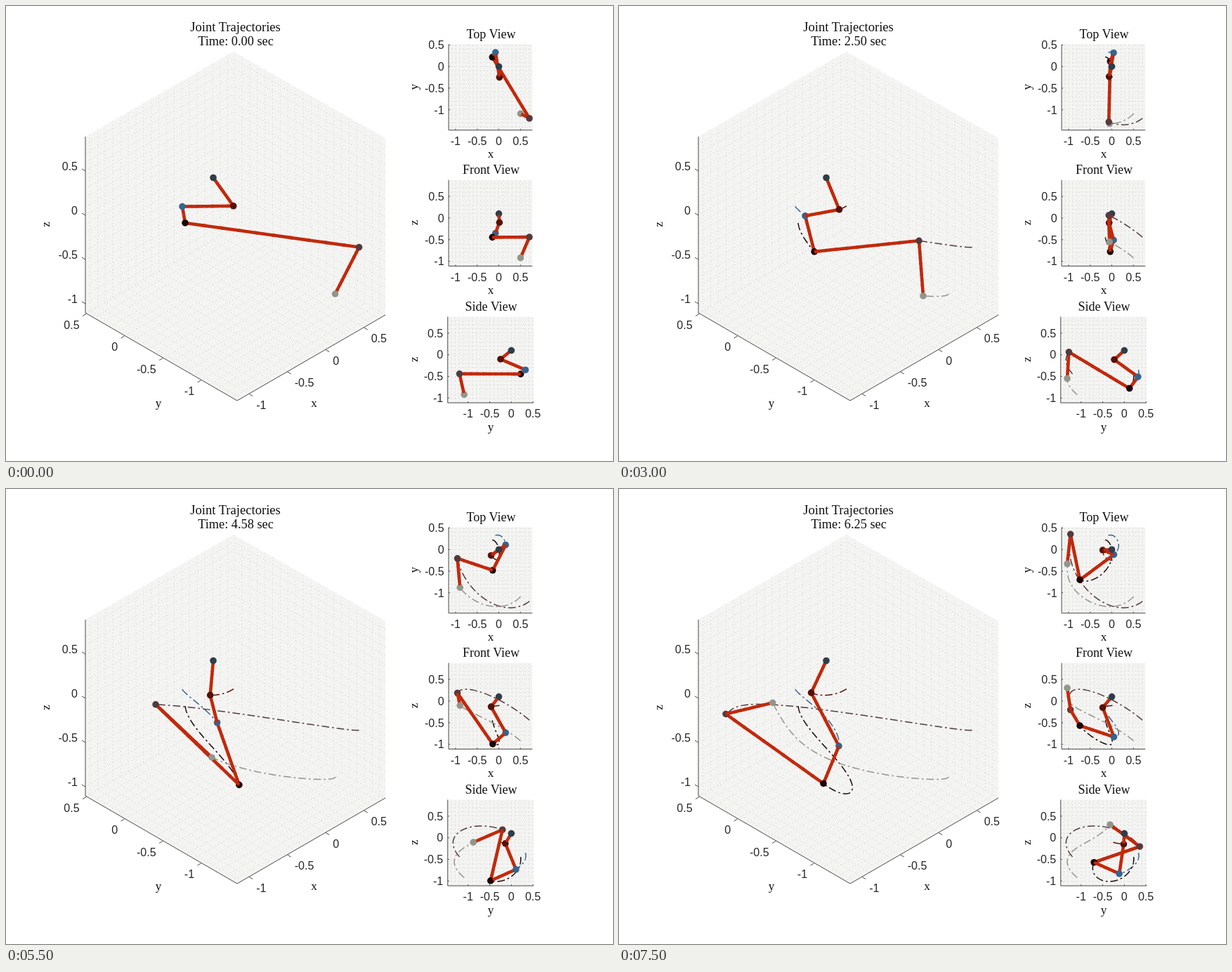
These frames come from a looping animation (864x648 px, 8 s). An HTML page:

```html
<!DOCTYPE html>
<html lang="en">
<head>
<meta charset="utf-8">
<title>Joint Trajectories</title>
<style>
  html, body { margin: 0; width: 100%; height: 100%; overflow: hidden; background: #fff; }
  svg { display: block; width: 864px; height: 648px; }
  .serif { font-family: "Liberation Serif", "Noto Serif", serif; fill: #111; }
  .tick { font: 16px "Liberation Sans", Inter, sans-serif; fill: #262626; }
  .face { fill: #f4f4f3; }
  .grid { stroke: #cfcfcc; stroke-width: 1; stroke-dasharray: 1 4; fill: none; }
  .axis { stroke: #4a4a4a; stroke-width: 1; fill: none; }
  .link { stroke: #c02a0c; stroke-width: 4.6; }
  .trail { fill: none; stroke-width: 1.5; stroke-dasharray: 10.7 4 2.7 4; }
</style>
</head>
<body>
<svg viewBox="0 0 864 648">
  <g id="back"></g>
  <g id="moving"></g>
</svg>
<script>
const LOOP = 8000, STEP = 500;
const COLORS = ['#2d3e49', '#561108', '#34658f', '#1c0604', '#543a3d', '#94958a'];

// All joints share one swing that starts at rest
const swing = t => 1 - Math.cos(t / 4);
const KEYS = [0, 3, 5, 6, 7.5].map(swing);

// Smooth curve through one [x, y, z] point per key
const through = (...points) => t => {
  const w = swing(t);
  const weights = KEYS.map(k => KEYS.reduce((p, m) => m === k ? p : p * (w - m) / (k - m), 1));
  return [0, 1, 2].map(axis => points.reduce((sum, p, i) => sum + p[axis] * weights[i], 0));
};

function shoulder(t) {
  const w = swing(t), r = .25 - .03 * w, a = -1.515 - 1.2 * w;
  return [r * Math.cos(a), r * Math.sin(a), -.102 - .037 * w];
}

const paths = [
  () => [0, 0, .1],
  shoulder,
  through([-.078, .326, -.35], [.041, .316, -.51], [.149, .163, -.69], [.153, .047, -.77], [.048, -.117, -.83]),
  through([-.15, .217, -.445], [-.037, .119, -.777], [-.049, -.338, -1.01], [-.274, -.604, -.936], [-.738, -.701, -.569]),
  through([.706, -1.198, -.44], [-.07, -1.281, .063], [-.877, -.464, .253], [-.978, .022, .082], [-.956, .356, -.203]),
  through([.502, -1.09, -.92], [-.054, -1.32, -.55], [-.775, -1.018, -.184], [-.977, -.734, -.025], [-1.03, -.33, .304])
];

const U = 61.6;
const VIEWS = [
  { at: ([x, y, z]) => [295 + 109 * (x - y), 257.1 - 63 * (x + y) - 126 * z],
    depth: ([x, y, z]) => (z - x - y) / 1.73 },
  { at: ([x, y]) => [701.5 + U * x, 86.2 - U * y], depth: p => p[2] },
  { at: ([x, , z]) => [701.5 + U * x, 302 - U * z], depth: p => -p[1] },
  { at: ([, y, z]) => [719.3 + U * y, 496.7 - U * z], depth: p => p[0] }
];

const fix = v => +v.toFixed(2);
const poly = pts => 'M' + pts.map(p => p.map(fix).join(' ')).join('L');
const path = (cls, pts, more = '') => `<path class="${cls}" d="${poly(pts)}" ${more}/>`;
const text = (cls, x, y, s, anchor = 'middle', more = '') =>
  `<text class="${cls}" x="${fix(x)}" y="${fix(y)}" text-anchor="${anchor}" ${more}>${s}</text>`;
const title = (x, y, s, size = 18) => text('serif', x, y, s, 'middle', `font-size="${size}"`);
const upright = (x, y, s) => text('serif', x, y, s, 'middle', `font-size="17" transform="rotate(-90 ${x} ${y})"`);
const tick = (x, y, v, anchor) => text('tick', x, y + 5.7, v, anchor);
const mix = (a, b, k) => a.map((v, i) => v + (b[i] - v) * k);

const MIN = [-1.16, -1.47, -1.11], MAX = [.775, .51, .88];
const MARKS = [-1, -.5, 0, .5];
const tenths = k => {
  const out = [];
  for (let i = Math.ceil(MIN[k] * 10); i <= MAX[k] * 10; i++) out.push(i / 10);
  return out;
};

// Grid lines of the plane spanned by axes a and b, the third held at `rest`
function grid(at, a, b, rest) {
  const line = (fixed, run) => tenths(fixed).map(v => {
    const p = [...rest], q = [...rest];
    p[fixed] = q[fixed] = v;
    p[run] = MIN[run];
    q[run] = MAX[run];
    return poly([at(p), at(q)]);
  }).join('');
  return `<path class="grid" d="${line(a, b) + line(b, a)}"/>`;
}

function mainAxes() {
  const at = VIEWS[0].at;
  const floor = [0, 0, MIN[2]], left = [0, MAX[1], 0], right = [MAX[0], 0, 0];
  let s = '<path class="face" d="M113 186L323.5 65L540 188V440L329 562L113 437Z"/>';
  s += grid(at, 0, 1, floor) + grid(at, 0, 2, left) + grid(at, 1, 2, right);
  s += path('axis', [[113, 186], [113, 437], [329, 562], [540, 440]]);
  for (const v of MARKS) {
    const [xx, xy] = at([v, MIN[1], MIN[2]]);
    const [yx, yy] = at([MIN[0], v, MIN[2]]);
    const [zx, zy] = at([MIN[0], MAX[1], v]);
    s += path('axis', [[xx, xy], [xx + 5, xy + 3]]) + tick(xx + 10, xy + 15.5, v, 'start');
    s += path('axis', [[yx, yy], [yx - 5, yy + 3]]) + tick(yx - 9.5, yy + 15.5, v, 'end');
    s += path('axis', [[zx, zy], [zx - 5, zy - 3]]) + tick(102, zy - 7, v, 'end');
  }
  return s + title(326.5, 36, 'Joint Trajectories', 18.6) +
    title(438.5, 571, 'x', 17) + title(217, 571, 'y', 17) + upright(61.5, 311, 'z');
}

function flatAxes(view, name, a, b) {
  const at = VIEWS[view].at;
  const point = (u, v) => {
    const p = [0, 0, 0];
    p[a] = u;
    p[b] = v;
    return at(p);
  };
  const [x0, y0] = point(MIN[a], MIN[b]), [x1, y1] = point(MAX[a], MAX[b]);
  let s = `<path class="face" d="${poly([[x0, y0], [x1, y0], [x1, y1], [x0, y1]])}Z"/>`;
  s += grid(at, a, b, [0, 0, 0]) + path('axis', [[x0, y1], [x0, y0], [x1, y0]]);
  for (const v of MARKS) {
    const [x, y] = point(v, v);
    s += path('axis', [[x, y0], [x, y0 - 2]]) + path('axis', [[x0, y], [x0 + 2, y]]);
    s += tick(x, y0 + 15.5, v, 'middle') + tick(x0 - 6.5, y, v, 'end');
  }
  return s + title(690.5, y1 - 8.5, name) + title(690, y0 + 39.7, 'xyz'[a], 17) +
    upright(586, fix((y0 + y1) / 2 - .5), 'xyz'[b]);
}

function trail(view, j, time) {
  const pts = [], n = Math.round(time * 24);
  for (let i = 0; i <= n; i++) pts.push(view.at(paths[j](time * i / n)));
  return path('trail', pts, `stroke="${COLORS[j]}"`);
}

// Short link pieces and joints, painted from far to near
function arm(view, joints) {
  const items = [], PIECES = 10;
  joints.forEach((p, j) => {
    const [x, y] = view.at(p);
    items.push({
      depth: view.depth(p) + .03,
      svg: `<circle cx="${fix(x)}" cy="${fix(y)}" r="4.8" fill="${COLORS[j]}"/>`
    });
    if (!j) return;
    const from = joints[j - 1];
    for (let i = 0; i < PIECES; i++) {
      const end = Math.min(1, (i + 1.2) / PIECES);
      items.push({
        depth: view.depth(mix(from, p, (i + .5) / PIECES)),
        svg: path('link', [view.at(mix(from, p, i / PIECES)), view.at(mix(from, p, end))])
      });
    }
  });
  return items.sort((a, b) => a.depth - b.depth).map(i => i.svg).join('');
}

document.getElementById('back').innerHTML = mainAxes() +
  flatAxes(1, 'Top View', 0, 1) + flatAxes(2, 'Front View', 0, 2) + flatAxes(3, 'Side View', 1, 2);

const moving = document.getElementById('moving');
let shown = -1;

function draw(now) {
  const step = Math.floor(now % LOOP / STEP);
  if (step !== shown) {
    shown = step;
    const time = step * STEP / 1000;
    const joints = paths.map(f => f(time));
    let s = title(327, 56, `Time: ${(time / 1.2).toFixed(2)} sec`, 18.3);
    for (const view of VIEWS) {
      if (step) for (let j = 1; j < paths.length; j++) s += trail(view, j, time);
      s += arm(view, joints);
    }
    moving.innerHTML = s;
  }
  requestAnimationFrame(() => draw(performance.now()));
}
draw(performance.now());
</script>
</body>
</html>
```
